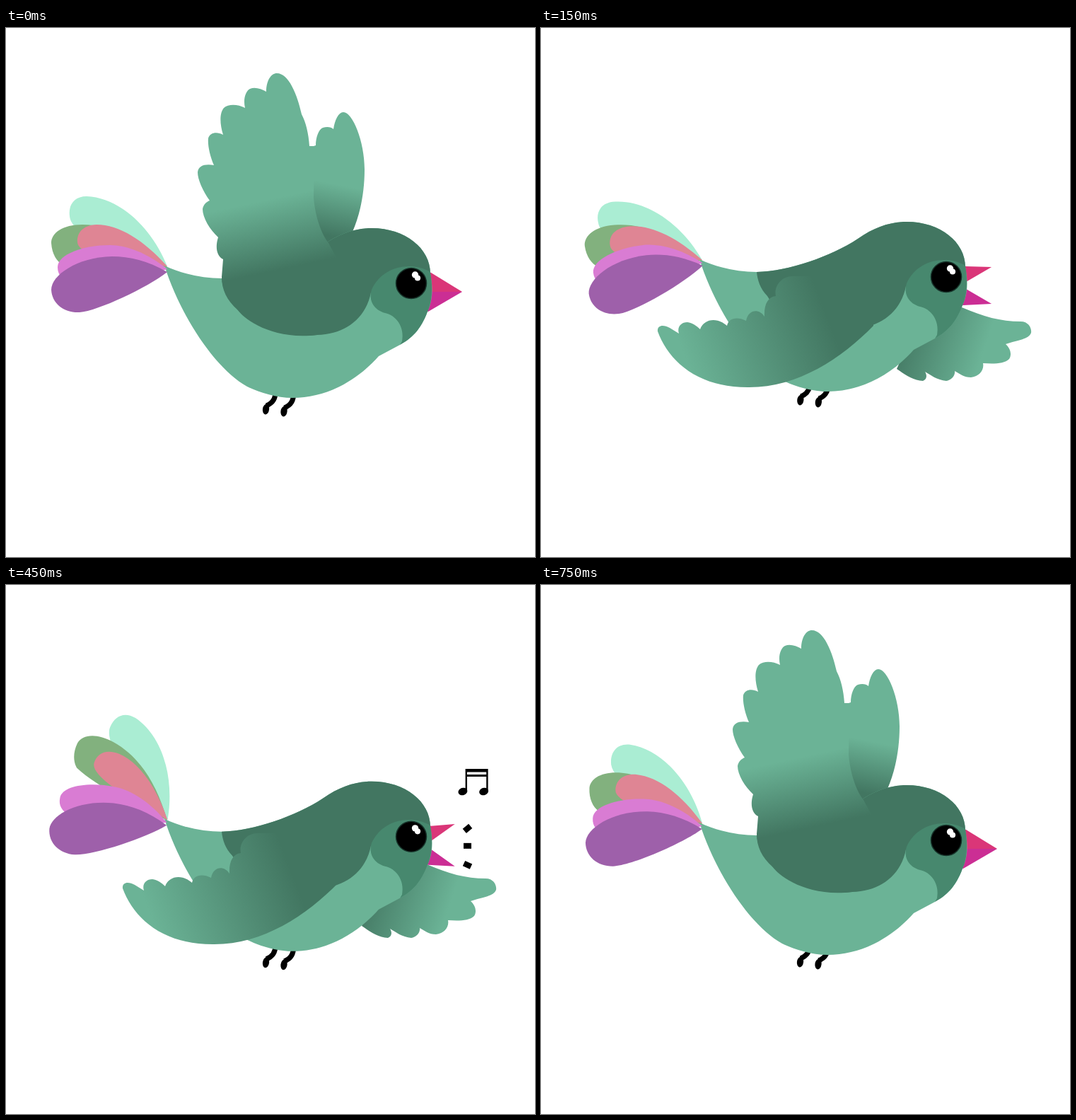
An HTML page for the animation above (0.8 s loop, 748 px wide and 748 px high).

```html
<!DOCTYPE html>
<html lang="en">
<head>
<meta charset="utf-8">
<title>Singing bird</title>
<style>
html, body { margin: 0; width: 100%; height: 100%; overflow: hidden; background: #fff; }
svg { display: block; width: 100vw; height: 100vh; }
</style>
</head>
<body>
<svg viewBox="0 0 748 748" xmlns="http://www.w3.org/2000/svg">
  <defs id="defs"></defs>

  <g id="farWings"></g>

  <g id="legs" stroke="#000" stroke-width="7" fill="none">
    <g id="leg">
      <path d="M381 512 Q382 529 368 534"/>
      <ellipse cx="367.5" cy="539" rx="4.6" ry="7.4" fill="#000" stroke="none" transform="rotate(8 367 539)"/>
    </g>
    <use href="#leg" x="25.5" y="3"/>
  </g>

  <g id="body">
    <path id="beakTop" fill="#da3678"/>
    <path id="beakLow" fill="#cb2e94"/>
    <path fill="#6bb396" d="M224 336 C250 348 278 354 305 354 C350 353 410 332 448 307 C472 290 495 283 517 283
      C565 283 600 312 600 347 C605 372 602 388 596 401 C586 428 573 439 557 448 L527 464
      C495 500 452 523 405 523 C382 523 357 515 341 507 C296 482 247 408 224 336 Z"/>
    <path fill="#427661" d="M305 354 C350 353 410 332 448 307 C472 290 495 283 517 283 C565 283 600 312 600 347
      L560 375 L516 374 C509 410 480 433 440 434 C412 438 340 425 320 388 C310 378 306 365 305 354 Z"/>
    <path fill="#47886e" d="M600 345 C572 329 532 337 517 370 C512 386 521 399 536 403 C551 406 564 422 560 443
      L557 448 C573 439 586 428 596 401 C602 388 604 370 600 345 Z"/>
    <circle cx="573" cy="361" r="21.5" fill="#000" stroke="#17332a" stroke-width="1.5"/>
    <g fill="#fff"><circle cx="578.5" cy="349" r="4.7"/><circle cx="582" cy="353.5" r="4.1"/></g>
    <g id="tail"></g>
    <g id="chirps" stroke="#000" stroke-width="8"></g>
  </g>

  <g id="nearWings"></g>

  <g id="note">
    <path d="M-11 -19H21V13H18.6V-8H-8.6V13H-11Z M-8.6 -14.5V-11H18.6V-14.5Z" fill-rule="evenodd"/>
    <ellipse cx="-14.7" cy="13" rx="6.6" ry="5.2" transform="rotate(-18 -14.7 13)"/>
    <ellipse cx="15" cy="13" rx="6.6" ry="5.2" transform="rotate(-18 15 13)"/>
  </g>
</svg>
<script>
const LOOP = 800, STEP = 50;
const LIGHT = '#6bb396', DARK = '#427661';
const el = id => document.getElementById(id);

function add(parent, tag, attrs) {
  const node = document.createElementNS('http://www.w3.org/2000/svg', tag);
  for (const k in attrs) node.setAttribute(k, attrs[k]);
  return parent.appendChild(node);
}

// Each pose: shading axis (light end to dark end) and outline.
const poses = {
  up: {
    near: ['360 245 381 343', `M307 327 C297 322 296 308 300 296 C288 285 278 268 278 256 C279 250 283 246 288 244
      C278 230 271 214 271 204 C272 194 282 192 294 194 C288 180 285 165 286 156 C288 148 298 146 307 151
      C302 135 302 120 308 113 C315 107 328 108 338 113 C335 100 339 89 345 86 C352 83 361 86 368 90
      C368 74 375 64 383 64 C400 64 412 95 418 122 C424 133 428 150 429 167 L436 167 L435 240
      C437 265 445 290 456 304 L470 330 L440 434 C375 442 335 410 328 399 C312 385 305 370 305 352 Z`],
    far: ['472 222 458 294', `M435 167 L438 166 C438 155 442 143 448 141 C454 139 460 140 463 143
      C465 130 470 119 477 119 C490 119 507 160 507 200 C507 235 500 265 490 288 L455 308 L430 270 Z`]
  },
  raised: {
    near: ['247 245 345 345', `M218 377 C198 376 189 363 196 349 C198 343 200 340 204 337 C188 326 186 309 202 303
      C194 285 198 266 218 263 C215 245 220 227 240 227 C235 210 242 193 255 191 L270 191 C274 170 285 161 294 162
      C302 163 308 165 313 170 C312 152 322 144 333 144 C352 145 357 160 356 185 C355 210 349 225 348 245
      C349 275 370 305 382 327 C388 321 398 324 406 321 L440 312 L440 432 L400 427
      C380 426 350 428 310 421 C270 413 240 400 218 377 Z`],
    far: ['455 205 447 316', `M385 327 L403 321 C394 314 390 303 393 295 C397 290 404 290 409 291
      C398 281 394 268 398 262 L413 261 C398 250 389 234 393 222 C400 217 408 219 413 219
      C400 210 394 195 396 188 C400 181 410 181 417 182 L417 145 C417 138 425 138 432 143
      C470 170 515 215 515 283 L440 325 Z`]
  },
  low: {
    near: ['205 470 400 396', `M165 429 C164 420 173 419 182 424 L195 432 C192 423 198 416 207 416
      C214 417 220 421 225 426 C230 412 248 408 263 421 C265 411 276 407 290 414 C293 398 308 396 316 408
      C315 391 321 380 332 379 C329 365 340 352 354 351 L400 350 L470 360 L470 421
      C424 468 362 509 292 508 C220 508 180 470 165 429 Z`],
    far: ['625 460 508 420', `M595 395 C625 408 650 415 678 415 C690 415 694 425 693 431 C690 440 675 441 657 447
      C664 453 666 462 662 468 C655 475 640 475 625 474 C627 483 620 493 608 494 C598 494 592 489 585 485
      C586 492 580 498 573 499 C560 498 550 490 543 486 C546 491 546 497 540 499
      C525 498 512 488 503 482 L540 400 Z`]
  },
  down: {
    near: ['262 530 350 430', `M322 378 C300 380 288 391 293 404 C272 401 258 414 259 432 C242 440 230 456 242 476
      C241 490 240 510 242 524 C245 538 255 539 264 536 C269 560 277 583 287 581 C291 580 292 573 295 573
      C310 595 328 616 336 616 C343 612 340 600 340 590 C358 608 376 621 386 619 C388 616 386 613 384 609
      C375 590 374 540 378 515 C382 480 410 455 445 423 L445 380 L380 370 Z`],
    far: ['605 530 570 445', `M590 396 C625 420 642 465 642 500 C642 540 632 590 619 602 C613 606 606 604 604 596
      L600 570 C599 578 594 582 588 580 C580 572 575 558 571 545 C569 550 563 550 559 547 C552 538 546 530 543 520
      C538 525 533 522 529 517 L520 499 C512 500 506 486 502 478 L545 400 Z`]
  }
};

function buildWing(name, side) {
  const [axis, d] = poses[name][side];
  const [x1, y1, x2, y2] = axis.split(' ');
  const id = name + side;
  const grad = add(el('defs'), 'linearGradient', { id, gradientUnits: 'userSpaceOnUse', x1, y1, x2, y2 });
  add(grad, 'stop', { offset: 0, 'stop-color': LIGHT });
  add(grad, 'stop', { offset: 1, 'stop-color': DARK });
  return add(el(side + 'Wings'), 'path', { d, fill: `url(#${id})` });
}
const wings = Object.keys(poses).map(name => ({
  name, parts: [buildWing(name, 'near'), buildWing(name, 'far')]
}));

// Feathers: colour, outline, turn at each of tailTimes.
const tailTimes = [0, 100, 200, 250, 350, 450, 500, 550, 750, 800];
const feathers = [
  ['#aaedd3', 'M228 337 C207 284 162 240 114 238 C95 238 88 252 90 266 C92 290 140 310 228 337 Z',
    [0, -6.5, -9.5, -9.5, 10, 31.5, 41, 35, 6.5, 0]],
  ['#82b17e', 'M228 338 C190 300 150 278 108 278 C80 278 64 290 64 304 C65 320 72 330 80 335 C120 345 180 340 228 338 Z',
    [0, -4, -5, -5, 12.5, 29, 36, 31, 6, 0]],
  ['#df8594', 'M228 337 C195 300 160 278 128 278 C108 279 100 290 101 303 C102 320 150 330 228 337 Z',
    [0, -4, -9, -9.5, 5, 23, 30, 26, 6, 0]],
  ['#d97cd3', 'M228 341 C200 318 170 307 147 307 C110 307 73 320 73 338 C73 350 80 355 90 360 C140 365 200 350 228 341 Z',
    [0, -4.4, -8, -8, 1.6, 12, 15, 13.5, 3, 0]],
  ['#9e60aa', 'M228 345 C200 329 175 323 150 323 C100 324 64 350 64 370 C65 390 82 403 104 402 C130 400 200 367 228 345 Z',
    [0, -3.5, -7, -7, 0.5, 7, 10, 8.5, 2, 0]]
].map(([fill, d, turns]) => ({ turns, node: add(el('tail'), 'path', { fill, d }) }));

const chirps = [[-40, 360.5, -0.5], [0, 374, 0], [25, 390, 0.5]].map(([angle, y, slope]) =>
  ({ angle, y, slope, node: add(el('chirps'), 'line', { y1: 0, y2: 0 }) }));

// Piecewise linear value of keys at time t.
function track(t, times, values) {
  let i = 1;
  while (i < times.length - 1 && t > times[i]) i++;
  const k = (t - times[i - 1]) / (times[i] - times[i - 1]);
  return values[i - 1] + (values[i] - values[i - 1]) * Math.min(1, Math.max(0, k));
}

function wingPose(t) {
  if (t < 50 || t >= 600) return 'up';
  if (t < 100 || t >= 500) return 'raised';
  if (t < 200 || t >= 400) return 'low';
  return 'down';
}

const move = (node, value) => node.setAttribute('transform', value);
const show = (node, on) => node.setAttribute('visibility', on ? 'visible' : 'hidden');

function draw(t) {
  const bob = track(t, [0, 200, 250, 600, 800], [0, -12, -12, 0, 0]);
  move(el('body'), `translate(0 ${bob})`);

  const lift = track(t, [0, 100, 250, 350, 550, 650, 750, 800], [0, -4, -4, 0, 0, -5, -6, 0]);
  move(el('legs'), `translate(${lift / 6} ${bob + lift})`);

  const pose = wingPose(t);
  for (const w of wings) w.parts.forEach(p => show(p, w.name === pose));
  for (const f of feathers) move(f.node, `rotate(${track(t, tailTimes, f.turns)} 228 338)`);

  const open = track(t, [0, 100, 200, 400, 450, 550, 650, 800], [0, 0.45, 1, 1, 0.83, 0.45, 0, 0]);
  const tip = 645 - 15 * open * open;
  el('beakTop').setAttribute('d', `M595 344 L601 346 L${tip} ${373 - 36 * open} L601 ${373 - 7 * open} H590 Z`);
  el('beakLow').setAttribute('d', `M590 ${373 + 7 * open} H601 L${tip} ${373 + 36 * open} L597 401 H590 Z`);

  show(el('chirps'), t >= 200 && t < 600);
  const run = 0.11 * (t - 250);
  const half = track(t, [200, 250, 350, 450, 600], [9, 9.5, 8.5, 5.5, 1]);
  for (const c of chirps) {
    c.node.setAttribute('x1', -half);
    c.node.setAttribute('x2', half);
    move(c.node, `translate(${630.5 + run} ${c.y + c.slope * run}) rotate(${c.angle})`);
  }

  show(el('note'), t >= 250 && t < 650);
  const x = track(t, [250, 350, 600], [621.5, 642, 688.5]);
  const y = track(t, [250, 350, 450, 550, 650], [335, 302.5, 279, 260, 244]);
  move(el('note'), `translate(${x} ${y}) scale(${track(t, [250, 350, 400], [0.12, 0.81, 1])})`);
}

const start = performance.now();
function tick() {
  const t = (performance.now() - start) % LOOP;
  draw(Math.floor(t / STEP) * STEP);
  requestAnimationFrame(tick);
}
tick();
</script>
</body>
</html>
```
